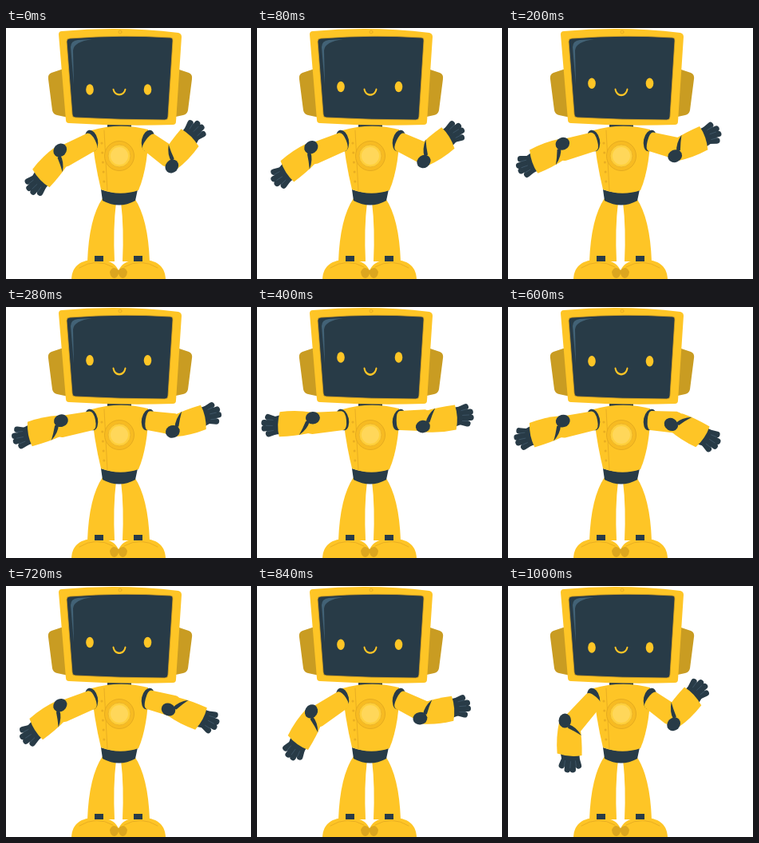
Recreate the animation shown at these times as an HTML page. Size 307x314 px, loop 1040 ms.

```html
<!DOCTYPE html>
<html lang="en">
<head>
<meta charset="utf-8">
<title>Waving robot</title>
<style>
html, body { margin: 0; width: 100%; height: 100%; overflow: hidden; background: #fff; }
svg { display: block; width: 307px; height: 314px; }
.y { fill: #fec526; }
.d { fill: #283b47; }
.line { fill: none; stroke: #e9ae22; stroke-linecap: round; }
.finger { fill: none; stroke: #283b47; stroke-width: 7.5; stroke-linecap: round; stroke-linejoin: round; }
.gap { fill: none; stroke: #40586a; stroke-width: .8; stroke-linecap: round; }
</style>
</head>
<body>
<svg viewBox="0 0 307 314">
  <defs>
    <!-- Limbs point left; the right arm is the same one turned by 180 degrees. -->
    <path id="upper" class="y" d="M-1-12Q4-11 4 0T-1 12L-40 13.5Q-52 12-52 0T-40-13.5Z"/>
    <g id="fore">
      <path class="finger" d="M-46 1L-56-3M-46 6L-61 4M-46 10L-61 11M-46 15L-56 18"/>
      <path class="d" d="M-40-5L-49-3Q-54 8-49 19L-40 19Z"/>
      <path class="gap" d="M-50 1L-57 0M-51 8L-59 7.5M-50 14L-57 15"/>
      <path class="y" d="M-1-7Q-20-11-41-9Q-46 7-43 22Q-22 22-6 19Q6 14 5 2Z"/>
      <path class="d" d="M-4 4Q-7 14-18 21Q-13 13-9 4Z"/>
      <ellipse class="d" rx="9" ry="7.8"/>
    </g>
    <path id="ear" fill="#c99c22" d="M75 50L57 56Q52 58 53 64L58 103Q59 108 64 109L78 112Z"/>
    <g id="leg">
      <path class="y" d="M121 213Q104 238 102 292H136Q134 250 138 218Z"/>
      <path class="y" d="M82 314C83 297 94 290 112 290C132 290 138 296 141 304V314Z"/>
      <path class="d" d="M111 285h11v7h-11z"/>
      <path class="line" d="M92 300Q113 287 134 299"/>
      <path fill="#dca61f" d="M141 303Q134 296 130 305Q131 313 136 313Q140 312 141 307Z"/>
    </g>
  </defs>

  <use href="#leg"/>
  <use href="#leg" transform="translate(282 0) scale(-1 1)"/>

  <path class="d" d="M127 117h30v10h-30zM119 202Q141 210 165 202L162 216Q142 227 121 216Z"/>
  <path class="y" d="M107 128Q142 118 178 127C179 152 175 182 166 203Q142 211 119 202Q110 165 107 128Z"/>
  <path class="line" d="M123 128Q125 165 127 204"/>
  <path class="line" stroke-width="3" stroke-dasharray="0 12" d="M120 144L123 194"/>
  <circle cx="142" cy="160" r="18.5" fill="#f7bb22" stroke="#e5ab20"/>
  <circle cx="142" cy="160" r="14" fill="#ffd03c" stroke="#edb62a"/>
  <circle cx="142" cy="160" r="11" fill="#ffd75a"/>
  <ellipse class="d" cx="107" cy="141" rx="8" ry="13.5" transform="rotate(-12 107 141)"/>
  <ellipse class="d" cx="178" cy="141" rx="8" ry="13.5" transform="rotate(12 178 141)"/>

  <g id="armL"><use href="#upper"/><use id="foreL" href="#fore"/></g>
  <g id="armR"><use href="#upper" transform="scale(.82 1)"/><use id="foreR" href="#fore"/></g>

  <use href="#ear"/>
  <use href="#ear" transform="translate(286 0) scale(-1 1)"/>
  <path class="y" d="M70 4Q143-3 216 6Q220 7 220 11L213 117Q213 121 209 121Q143 123 79 119Q75 119 75 115L66 8Q66 4 70 4Z"/>
  <path class="d" stroke="#d9a322" stroke-width=".8" d="M80 13Q145 8 206 12Q209.500 12 209 16L203 111Q203 115 199 115Q144 115 87 112Q83 112 83 108L76 17Q76 13 80 13Z"/>
  <path fill="#426276" d="M85 71L81 24Q81 16 90 15L108 14Q85 17 84 28Z"/>
  <circle class="line" cx="143" cy="5" r="2"/>
  <g id="eyes" class="y">
    <ellipse cx="105" rx="4.800" ry="6.700"/>
    <ellipse cx="177.500" rx="4.800" ry="6.700"/>
  </g>
  <path id="mouth" class="y" d="M-8.500 0Q-7.500-2-6.500 0C-5 9 5 9 6.500 0Q7.500-2 8.500 0C7 12.500-7 12.500-8.500 0Z"/>
</svg>
<script>
const LOOP = 1040, STEP = 40;
const pow = p => u => u ** p;
const soft = u => u * u * (3 - 2 * u);

// Eases from the first value to `mid` at time `peak`, then on to the last value.
const swing = (from, peak, mid, to, rise, fall) => t => t < peak
  ? from + (mid - from) * rise(t / peak)
  : mid + (to - mid) * fall((t - peak) / (LOOP - peak));

const leftFore = swing(47, 460, -4, 97, pow(.9), pow(1.15));
const rightUpper = swing(36, 440, -3, 36, pow(.75), soft);
const rightLift = swing(-7, 240, 33, -49, soft, soft);
const eyeHeight = swing(77, 400, 63, 78, pow(.85), pow(1));

// The right forearm pauses briefly at 400 ms before dropping.
const rightFore = t => t < 400
  ? -49 + 42 * (t / 400) ** .7
  : t < 640 ? -7 + 40 * soft((t - 400) / 240) : 33 - 82 * soft((t - 640) / 400);

const place = (id, value) => document.getElementById(id).setAttribute('transform', value);

function poseArm(side, x, bone, base, upper, fore) {
  place('arm' + side, `translate(${x} 142) rotate(${base + upper})`);
  place('fore' + side, `translate(${-bone} 0) rotate(${fore - upper}) translate(7 -7)`);
}

function draw(now) {
  const t = Math.floor(now % LOOP / STEP) * STEP;
  const left = leftFore(t), eyes = eyeHeight(t);
  poseArm('L', 108, 45, 0, -4 - left / 2, -left);
  poseArm('R', 178, 36, 180, rightUpper(t), rightFore(t));
  place('eyes', `translate(0 ${eyes})`);
  place('mouth', `translate(142 76.5) scale(1 ${1 - (eyes - 63) / 90})`);
}

const start = performance.now();
function tick() {
  draw(performance.now() - start);
  requestAnimationFrame(tick);
}
tick();
</script>
</body>
</html>
```
